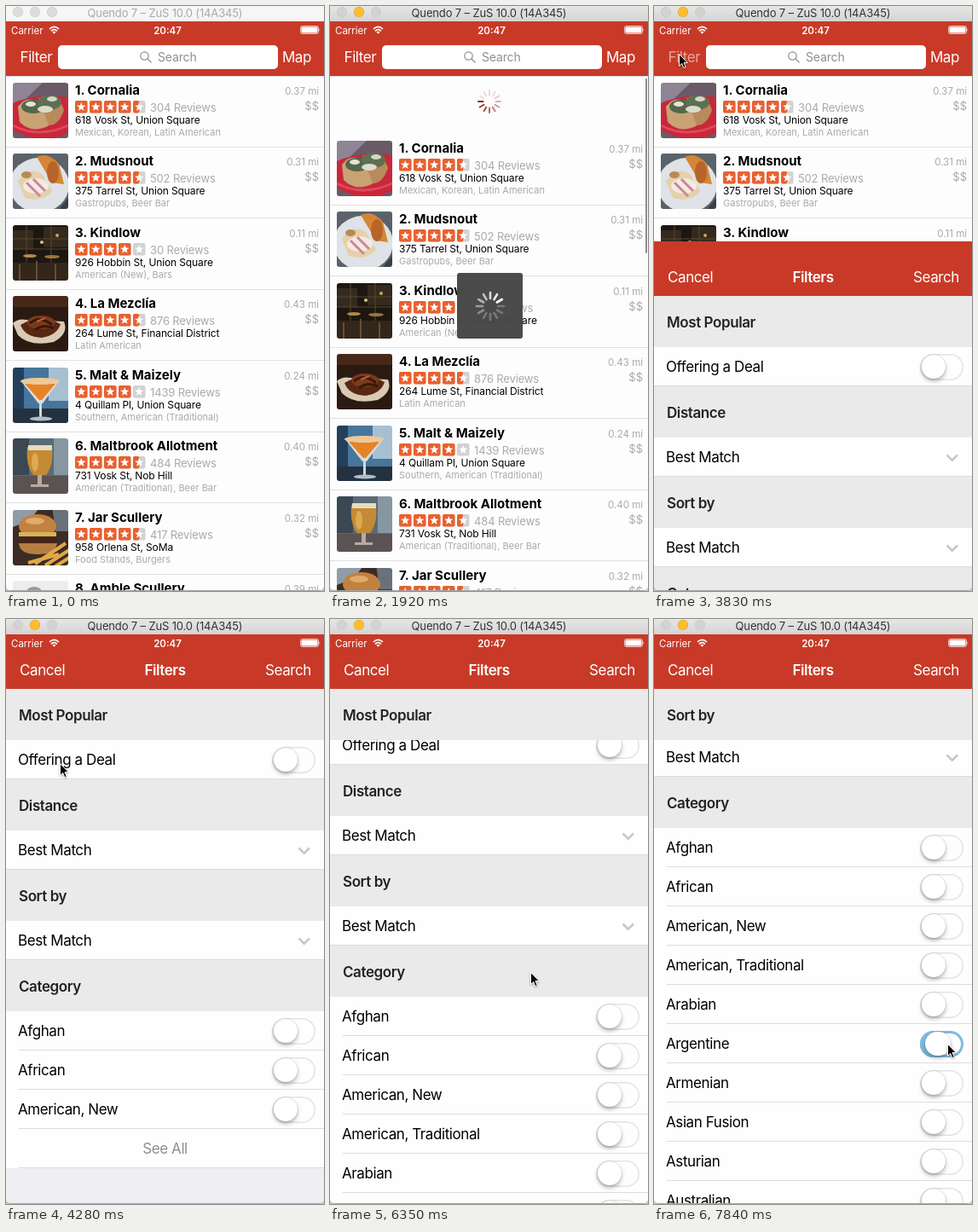
An HTML page for the animation above (7.99 s loop, 373 px wide and 686 px high).

```html
<!DOCTYPE html>
<html lang="en">
<head>
<meta charset="utf-8">
<title>Restaurant filters</title>
<style>
html, body { margin: 0; width: 100%; height: 100%; overflow: hidden; background: #fff; }
#stage { position: relative; width: 373px; height: 686px; overflow: hidden; background: #fdfdfd;
  font: 17px Inter, "Open Sans", sans-serif; color: #000; }
#stage div, #stage span, #stage svg { position: absolute; }
#stage span { line-height: 0; white-space: nowrap; }
.bar { left: 0; top: 0; width: 373px; height: 64px; background: #c83a27; color: #fff; letter-spacing: -.41px; box-shadow: 0 1px rgba(0,0,0,.12); }
.bar span { top: 42px; }
.mid { left: 0; width: 100%; text-align: center; }

#title { width: 373px; height: 18px; background: #f6f6f6; color: #a9a9a9; font-size: 13px; letter-spacing: -.15px; }
#title span { top: 7.5px; }
#title i { position: absolute; top: 1px; width: 12px; height: 12px; border-radius: 50%; background: #dcdcdc; box-shadow: inset 0 0 0 .5px #c9c9c9; }
#title.active { background: linear-gradient(#e6e6e6, #d4d4d4); color: #333; }
#title.active i { background: #d2d2d2; }
#title.active i:nth-of-type(2) { background: #fdbd2e; box-shadow: inset 0 0 0 .5px #dfa023; }
#status { top: 18px; width: 373px; height: 20px; color: #fff; font-size: 11.5px; }
#status span { top: 10.5px; }

#home, #modal { top: 18px; width: 373px; height: 668px; }
#home { overflow: hidden; }
#field { left: 61px; top: 28px; width: 258px; height: 28px; border-radius: 5px; background: #fff; color: #8e8e93; }
#field span { left: 117px; top: 14px; font-size: 14px; letter-spacing: -.15px; }
#list { top: 64px; width: 373px; }
.place { left: 0; width: 373px; height: 83px; border-bottom: 1px solid #e0e0e0; color: #aaa; }
.place svg { left: 8px; top: 8px; border-radius: 3px; }
.place svg.stars { left: 81px; top: 29px; border-radius: 0; }
.photo { filter: blur(.7px); }
.place span { left: 81px; }
.name { top: 17px; font-size: 15px; font-weight: 700; color: #000; }
.place .count { left: 169px; top: 36.5px; font-size: 13px; letter-spacing: -.15px; }
.addr { top: 52px; font-size: 12px; letter-spacing: -.12px; color: #000; }
.kind { top: 66px; font-size: 11px; }
.place .far, .place .cost { left: auto; right: 6px; }
.far { top: 17.5px; font-size: 11.5px; }
.cost { top: 35px; font-size: 13px; }

#hud { left: 149px; top: 313px; width: 77px; height: 77px; border-radius: 3px; background: rgba(72,72,72,.98); }
.thumb { left: 369.5px; width: 2.5px; border-radius: 2px; background: #8c8c8c; }

#table { top: 64px; width: 373px; height: 604px; overflow: hidden; background: #eeeef3; letter-spacing: -.41px; }
#stage section { position: relative; }
#stage .head { position: sticky; top: 0; z-index: 2; height: 60px; background: #eaeaea; }
.head span { left: 15px; top: 30.5px; font-weight: 600; color: #222; }
#stage .row { position: relative; height: 46px; background: #fefefe; }
.row > span { left: 14px; top: 23px; }
.row::after { content: ""; position: absolute; left: 0; right: 0; bottom: 0; height: 1px; background: #dcdcdc; }
.many .row::after { left: 15px; }
.row svg { left: 342px; top: 18px; }
#stage .row.more span { left: 0; color: #8e8e93; }
.sw { left: 312px; top: 7.5px; width: 51px; height: 31px; border-radius: 16px; background: #fefefe; box-shadow: inset 0 0 0 1.5px #e3e3e3; }
.sw::after { content: ""; position: absolute; left: 1.5px; top: 1.5px; width: 28px; height: 28px; border-radius: 14px;
  background: #fff; box-shadow: 0 0 0 .5px rgba(0,0,0,.15), 0 3px 5px rgba(0,0,0,.28); }
.sw.on { background: linear-gradient(90deg, #80bbdc 16px, #fefefe 16px); box-shadow: inset 0 0 0 3px #80bbdc; }
.sw.on::after { left: 6px; width: 30px; }
#stack { left: 0; width: 373px; height: 11px; top: 424px;
  background: repeating-linear-gradient(#dcdcdc 0 1px, #fefefe 1px 2.5px) 15px 0 no-repeat #fefefe; }
#frame { inset: 18px 0 0; border-bottom: 1px solid #a5a5a5; border-radius: 0 0 5px 5px; box-shadow: 0 0 0 8px #c9c9c9; clip-path: inset(0); }
#cursor { left: -1px; top: -1px; overflow: visible; filter: drop-shadow(0 1px 1px rgba(0,0,0,.35)); }
</style>
</head>
<body>
<div id="stage">
  <div id="home">
    <div id="list"></div>
    <svg id="refresh" width="32" height="32" viewBox="-16 -16 32 32" style="left:171px;top:78px"></svg>
    <div class="thumb" id="listThumb" style="top:67px"></div>
    <div class="bar">
      <span id="filter" style="left:16.5px">Filter</span>
      <div id="field">
        <svg width="16" height="16" style="left:95px;top:6px" fill="none" stroke="#8e8e93" stroke-width="1.2"><circle cx="6.5" cy="6.5" r="4.7"/><path d="M10 10l4.5 4.5"/></svg>
        <span>Search</span>
      </div>
      <span style="right:15px">Map</span>
    </div>
  </div>
  <div id="hud"><svg width="40" height="40" viewBox="-20 -20 40 40" style="left:18.5px;top:18.5px"></svg></div>
  <div id="modal">
    <div class="bar">
      <span style="left:16px">Cancel</span><span class="mid" style="font-weight:600">Filters</span><span style="right:15px">Search</span>
    </div>
    <div id="table"></div>
    <div class="thumb" id="tableThumb" style="height:47px"></div>
  </div>
  <div id="status">
    <span style="left:6px">Carrier</span><span class="mid" style="left:3px;font-weight:600">20:47</span>
    <svg width="14" height="11" style="left:50px;top:5px" fill="none" stroke="#fff" stroke-width="1.7"><path d="M1 4Q6.500 -1.500 12 4M3 6.300Q6.500 2.800 10 6.300"/><path d="M6.500 9.800L4.500 7.600Q6.500 6 8.500 7.600Z" fill="#fff" stroke="none"/></svg>
    <svg width="26" height="11" style="left:344px;top:5px" fill="#fff"><rect x="1.5" y=".5" width="21" height="9" rx="2" fill="none" stroke="#fff" stroke-opacity=".7"/><rect x="2.5" y="1.5" width="19" height="7" rx="1"/><path d="M23.500 3.500q1.700 1.500 0 3z"/></svg>
  </div>
  <div id="frame"></div>
  <div id="title"><i style="left:8px"></i><i style="left:28px"></i><i style="left:48px"></i><span class="mid">Quendo 7 – ZuS 10.0 (14A345)</span></div>
  <svg id="cursor" width="12" height="18"><path d="M.5 .5V14.500L3.700 11.500 5.900 16.700 8.200 15.700 6 10.600H10.300Z" stroke="#fff"/></svg>
</div>
<script>
const $ = id => document.getElementById(id);
const oval = (x, y, rx, ry, fill) => `<ellipse cx="${x}" cy="${y}" rx="${rx}" ry="${ry}" fill="${fill}"/>`;
const path = (d, fill) => `<path d="${d}" fill="${fill}"/>`;
const back = fill => path('M-5-5h75v75H-5z', fill);
const line = (d, color, w) => `<path d="${d}" fill="none" stroke="${color}" stroke-width="${w}"/>`;

const pictures = [
  back('#6a5a68') + path('M-5-5h45L8 26-5 30z', '#8f8494') + path('M-5 26Q30 10 70 18V56Q34 78-5 52z', '#c8283a')
    + path('M6 28Q16 14 32 24L46 48Q24 62 8 46z', '#c9a274') + path('M30 18Q52 8 60 32Q54 50 42 50z', '#b98a5c')
    + oval(24, 28, 14, 8, '#55664c') + oval(43, 23, 14, 9, '#5f6f54') + oval(38, 31, 9, 4, '#dcdccb')
    + oval(21, 25, 6, 3, '#e6e4d6') + oval(46, 19, 6, 3, '#d5d8c6') + line('M0 50Q30 66 65 50', '#e0475a', 3),
  back('#5b626c') + oval(31, 37, 35, 32, '#dfe2e6') + path('M28 4Q42-2 54 12L60 36 46 34z', '#d58535') + oval(47, 22, 7, 13, '#b7642b')
    + path('M6 32Q18 14 34 24L46 44Q36 58 14 52z', '#e6d0aa') + oval(27, 38, 15, 9, '#f1ebe3')
    + line('M16 34l16 16M24 30l14 14', '#cf8497', 3) + oval(16, 25, 6, 4, '#b98a52') + path('M50 70L70 46V70z', '#3b3f48'),
  back('#1d1712') + path('M0 6h24v22H0zM36 2h29v24H36z', '#352a1e') + line('M16 0v46M45 0v46M0 16h65M0 28h65', '#5a4630', 1)
    + path('M-5 44h75v26H-5z', '#33261a') + oval(20, 36, 8, 2, '#b28a46') + oval(46, 37, 9, 2, '#9a763c')
    + oval(34, 20, 2, 2, '#e0bf7a') + oval(52, 12, 2, 2, '#c9a55e') + line('M8 65V46M28 65V42M50 65V46', '#7a5e38', 1.5),
  back('#2b1a12') + path('M-5-5h75v18H-5z', '#452818') + path('M0 32Q6 26 16 28L60 30Q66 44 48 54Q20 60 6 46z', '#d9cab4')
    + path('M9 34Q32 20 56 33Q52 46 34 49Q14 48 9 34z', '#592813') + oval(33, 31, 16, 8, '#7c3a1c')
    + line('M20 32q12-10 26 2M26 40q10-8 22-2', '#3a170c', 3) + line('M28 30l10-4', '#b5623a', 2),
  back('#47759c') + path('M-5-5h18v75H-5z', '#22405d') + path('M42-5h28v44H42z', '#a6c0d2') + path('M-5 48h75v22H-5z', '#24323f')
    + path('M9 15H55L35 42H30z', '#dcdcd6') + path('M14 19H50L34 38H31z', '#e58326') + oval(32, 16, 23, 4, '#efc896')
    + path('M31 41h3v18h-3z', '#cfd9df') + oval(33, 60, 13, 2.5, '#aebdc8'),
  back('#5a6a77') + path('M-5-5h24v48H-5z', '#3a4854') + path('M48-5h22v48H48z', '#8797a2') + path('M-5 44h75v26H-5z', '#5b5253')
    + path('M17 10H46Q48 32 39 43H24Q15 32 17 10z', '#c58a34') + path('M18 8h28v6H18z', '#e8dcbd') + oval(26, 28, 4, 11, '#dca957')
    + path('M29 43h5v11h8v3H21v-3h8z', '#b7aba0'),
  back('#3b2c25') + path('M-5-5h38L20 12-5 22z', '#8f9ba6') + path('M46-5h24v30H50z', '#69727b') + oval(29, 19, 22, 14, '#c2813f')
    + oval(26, 13, 11, 4, '#deab6c') + path('M7 26h44v5H7z', '#d9b25a') + path('M6 31h47v8H6z', '#46241a') + path('M7 39h45q-2 13-23 13T7 39z', '#b67d43')
    + line('M26 63L62 39M38 65L66 47M18 62L54 52M50 66L66 56', '#e0a945', 4),
  back('#ededed') + oval(25, 13, 9, 6, '#9a9a9a')
];

function starBar(rating) {
  const star = Array.from({ length: 10 }, (_, i) => {
    const a = i * Math.PI / 5, r = i % 2 ? 2.3 : 5.5;
    return [7.25 + r * Math.sin(a), 7.4 - r * Math.cos(a)];
  }).join(' ');
  let out = '';
  for (let i = 0; i < 5; i++) {
    const full = Math.min(1, rating - i) * 14.5;
    out += `<g transform="translate(${i * 17})"><rect width="14.5" height="14.5" rx="2" fill="#d2d2d2"/>`
      + (full > 0 ? `<rect width="${full}" height="14.5" rx="2" fill="#e9602f"/>` : '')
      + `<polygon points="${star}" fill="#fff"/></g>`;
  }
  return `<svg class="stars" width="84" height="15">${out}</svg>`;
}

const places = [
  ['Cornalia', 4.5, 304, '618 Vosk St, Union Square', 'Mexican, Korean, Latin American', '0.37'],
  ['Mudsnout', 4.5, 502, '375 Tarrel St, Union Square', 'Gastropubs, Beer Bar', '0.31'],
  ['Kindlow', 4, 30, '926 Hobbin St, Union Square', 'American (New), Bars', '0.11'],
  ['La Mezclía', 4.5, 876, '264 Lume St, Financial District', 'Latin American', '0.43'],
  ['Malt & Maizely', 4, 1439, '4 Quillam Pl, Union Square', 'Southern, American (Traditional)', '0.24'],
  ['Maltbrook Allotment', 4.5, 484, '731 Vosk St, Nob Hill', 'American (Traditional), Beer Bar', '0.40'],
  ['Jar Scullery', 4.5, 417, '958 Orlena St, SoMa', 'Food Stands, Burgers', '0.32'],
  ['Amble Scullery', 4.5, 210, '147 Lume St, SoMa', 'Food Stands', '0.39']
];
$('list').innerHTML = places.map(([name, rating, count, addr, kind, far], i) => `
  <div class="place" style="top:${Math.round(i * 83.45)}px"><svg width="65" height="65"><g class="photo">${pictures[i]}</g></svg>
  <span class="name">${i + 1}. ${name.replace('&', '&amp;')}</span>${starBar(rating)}
  <span class="count">${count} Reviews</span><span class="addr">${addr}</span><span class="kind">${kind}</span>
  <span class="far">${far} mi</span><span class="cost">$$</span></div>`).join('');

const toggle = '<div class="sw"></div>';
const chevron = '<svg width="16" height="12" fill="none" stroke="#c7c7cc" stroke-width="2.6"><path d="M1.500 2.500L7.700 8.700 14 2.500"/></svg>';
const row = (label, extra) => `<div class="row"><span>${label}</span>${extra}</div>`;
const section = (label, rows, cls = '') => `<section class="${cls}"><div class="head"><span>${label}</span></div>${rows}</section>`;
const kinds = ['Afghan', 'African', 'American, New', 'American, Traditional', 'Arabian', 'Argentine', 'Armenian',
  'Asian Fusion', 'Asturian', 'Australian', 'Austrian', 'Baguettes', 'Bangladeshi'];
$('table').innerHTML = section('Most Popular', row('Offering a Deal', toggle))
  + section('Distance', row('Best Match', chevron)) + section('Sort by', row('Best Match', chevron))
  + section('Category', kinds.map(k => row(k, toggle)).join('') + '<div class="row more"><span class="mid">See All</span></div>', 'many')
  + '<div id="stack"></div>';
const kindRows = [...document.querySelectorAll('.many .row')];
const seeAll = kindRows.pop();
const argentine = kindRows[5].querySelector('.sw');

function makeSpinner(svg, inner, outer, width, color) {
  svg.innerHTML = Array.from({ length: 12 }, (_, i) =>
    `<path d="M0 ${-inner}V${-outer}" transform="rotate(${i * 30})" stroke="${color}" stroke-width="${width}" stroke-linecap="round"/>`).join('');
  return [...svg.children];
}
const refreshSpokes = makeSpinner($('refresh'), 7.5, 13, 2, '#8e1f18');
const hudSpokes = makeSpinner($('hud').firstChild, 9, 16, 2.6, '#fff');
function spin(spokes, head, floor) {
  spokes.forEach((s, i) => {
    const age = (((Math.round(head) - i) % 12) + 12) % 12;
    s.style.opacity = Math.max(floor, 1 - age * .11);
  });
}

// Every track is keyed by animation step.
const pull = [[4, 0], [5, 23], [6, 58], [7, 88], [8, 108], [9, 94], [10, 68], [11, 61], [12, 60], [15, 60], [16, 22], [17, 5], [18, 0]];
const slide = [[22, 668], [23, 258], [24, 55], [25, 10], [26, 0]];
const spread = [[34, 97], [35, 30], [36, 7], [37, 0]];
const scroll = [[39, 0], [40, 17], [41, 62], [42, 115], [43, 160], [44, 190], [45, 208], [46, 215]];
const pointer = [[0, 315, 309], [3, 272, 337], [4, 272, 337], [5, 275, 457], [6, 280, 570], [8, 285, 700], [14, 285, 700],
  [15, 220, 600], [18, 62, 130], [20, 30, 57], [25, 30, 57], [29, 166, 509], [32, 183, 617], [35, 183, 617],
  [38, 236, 432], [39, 236, 432], [40, 236, 415], [41, 236, 370], [43, 240, 320], [46, 343, 482], [48, 345, 499]];

function at(keys, k) {
  const n = keys.findIndex(p => p[0] >= k);
  if (n < 0) return keys[keys.length - 1].slice(1);
  if (n === 0) return keys[0].slice(1);
  const a = keys[n - 1], b = keys[n], u = (k - a[0]) / (b[0] - a[0]);
  return a.slice(1).map((v, i) => v + (b[i + 1] - v) * u);
}
const show = (el, on) => { el.style.display = on ? '' : 'none'; };
const within = (k, a, b) => k >= a && k <= b;
const LOOP = 7990, FIRST = 440, STEP = 148;

function draw(now) {
  const k = Math.max(-1, Math.floor((now % LOOP - FIRST) / STEP + .15));
  $('title').classList.toggle('active', k >= 5);

  const [drop] = at(pull, k);
  $('list').style.transform = `translateY(${drop}px)`;
  show($('refresh'), drop > 0);
  if (k < 8) refreshSpokes.forEach((s, i) => { s.style.opacity = i < (drop - 20) / 3.5 ? .7 : 0; });
  else spin(refreshSpokes, 9 + (k - 10) * 1.78, .15);
  $('refresh').style.opacity = Math.min(1, drop / 45);
  show($('hud'), within(k, 9, 15));
  spin(hudSpokes, 2 + (k - 10) * 1.78, .25);
  show($('listThumb'), within(k, 5, 16));
  $('listThumb').style.height = 193 + drop * .18 + 'px';
  $('filter').style.opacity = within(k, 22, 25) ? .55 : 1;

  show($('modal'), k >= 23);
  $('modal').style.transform = `translateY(${at(slide, k)[0]}px)`;
  const open = k >= 34;
  const [gap] = at(spread, k);
  kindRows.forEach((r, i) => {
    show(r, open || i < 3);
    r.style.transform = open && i && gap ? `translateY(${gap * i}px)` : '';
  });
  show(seeAll, !open);
  show($('stack'), k === 34);
  const [top] = at(scroll, k);
  $('table').scrollTop = top;
  show($('tableThumb'), within(k, 40, 47));
  $('tableThumb').style.top = 67 + top * .07 + 'px';
  $('tableThumb').style.opacity = k === 47 ? .5 : 1;
  argentine.classList.toggle('on', k >= 50);

  const [x, y] = at(pointer, k);
  show($('cursor'), k >= 0);
  $('cursor').style.transform = `translate(${x}px, ${y}px)`;
}
function tick() {
  draw(performance.now());
  requestAnimationFrame(tick);
}
tick();
</script>
</body>
</html>
```
